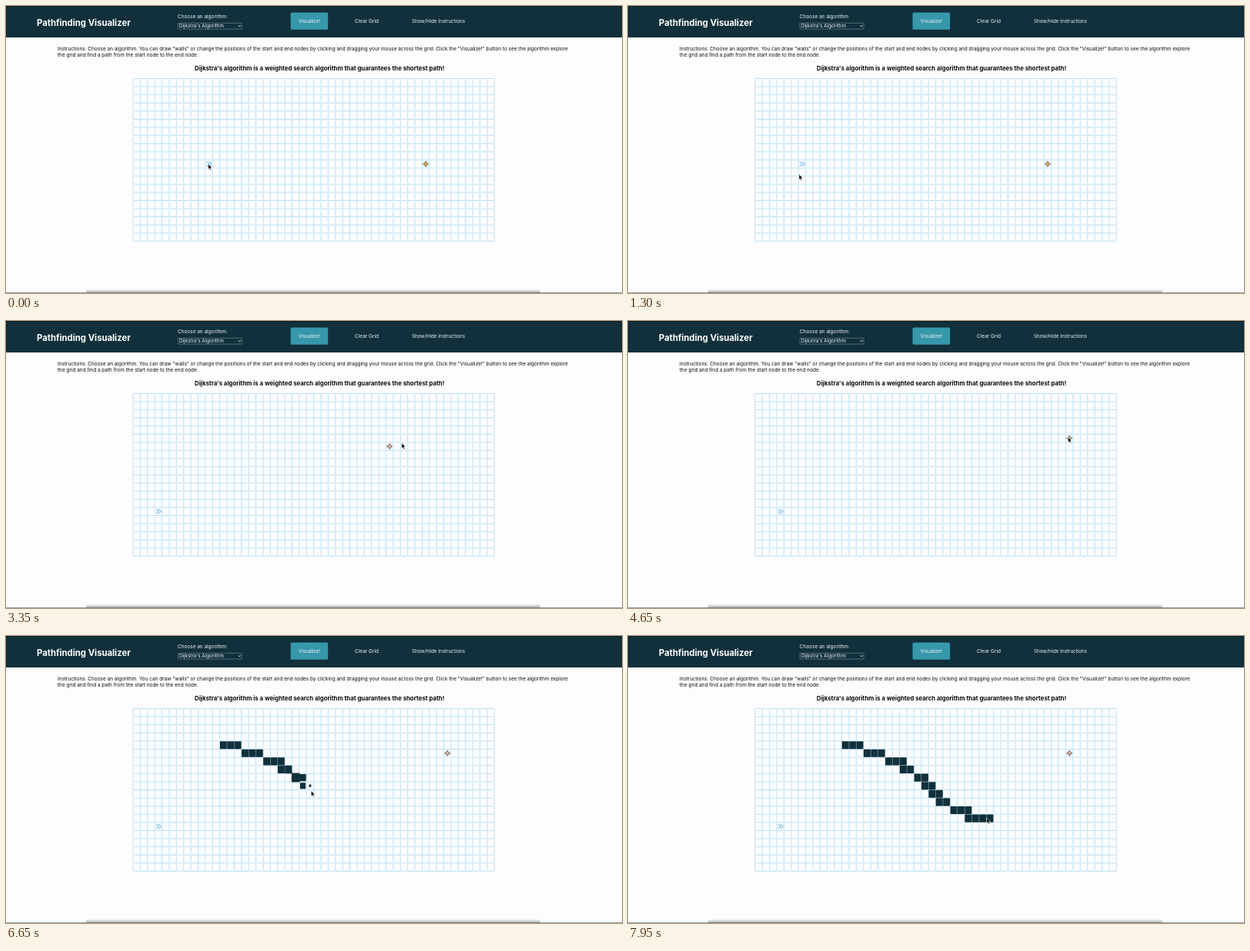
An HTML page for the animation above (8000 ms loop, 800 px wide and 374 px high).

```html
<!DOCTYPE html>
<html lang="en">
<head>
<meta charset="utf-8">
<title>Pathfinding Visualizer</title>
<style>
  html, body { margin: 0; width: 100%; height: 100%; overflow: hidden; background: #fdfdff; }
  svg { display: block; width: 100vw; height: 100vh; }
  text { font-family: Inter, Roboto, sans-serif; font-size: 6.45px; fill: #0c0c0e; }
  .nav text { fill: #eef3f5; font-size: 6.3px; }
  .nav .title { font-size: 11.3px; font-weight: 700; fill: #fff; }
  .headline { font-size: 7.8px; font-weight: 700; }
</style>
</head>
<body>
<svg viewBox="0 0 800 374">
  <defs>
    <linearGradient id="shade" x1="0" x2="0" y1="0" y2="1">
      <stop offset="0" stop-color="#777" stop-opacity="0"/>
      <stop offset="1" stop-color="#666" stop-opacity=".6"/>
    </linearGradient>
  </defs>
  <rect width="800" height="374" fill="#fdfdff"/>
  <g class="nav">
    <rect width="800" height="41" fill="#11303b"/>
    <rect width="800" height="1" fill="#0a1c23"/>
    <text class="title" x="40" y="25.5">Pathfinding Visualizer</text>
    <text x="223" y="16" style="font-size:6.45px">Choose an algorithm:</text>
    <rect x="223.4" y="22.3" width="82.8" height="7.8" rx=".6" fill="#11303b" stroke="#71858d" stroke-width=".7"/>
    <text x="225" y="28.4">Dijkstra's Algorithm</text>
    <path d="M301.6 25.2l1.6 1.8 1.6-1.8" fill="none" stroke="#eef3f5" stroke-width=".8"/>
    <rect x="369.6" y="8.6" width="48.6" height="22.2" rx="1.6" fill="#3797ab"/>
    <text x="394" y="22.2" text-anchor="middle">Visualize!</text>
    <text x="468.5" y="22.2" text-anchor="middle" style="font-size:6.5px">Clear Grid</text>
    <text x="561.5" y="22.2" text-anchor="middle">Show/Hide Instructions</text>
  </g>
  <text x="67" y="58.3">Instructions: Choose an algorithm. You can draw "walls" or change the positions of the start and end nodes by clicking and dragging your mouse across the grid. Click the "Visualize!" button to see the algorithm explore</text>
  <text x="67" y="66.2">the grid and find a path from the start node to the end node.</text>
  <text class="headline" x="407.2" y="83.7" text-anchor="middle">Dijkstra's algorithm is a weighted search algorithm that guarantees the shortest path!</text>
  <path id="grid" fill="none" stroke="#b9def4"/>
  <path id="start" d="M-2.8-3.1L.3 0-2.8 3.1M.3-3.1L3.4 0 .3 3.1" fill="none" stroke="#459fdb"/>
  <g id="goal" stroke="#5b5551" stroke-width=".75">
    <circle r="2.4"/>
    <path d="M0-4.2V-1.3M0 4.2V1.3M-4.2 0H-1.3M4.2 0H1.3"/>
  </g>
  <path id="walls" fill="#11303b"/>
  <rect x="104" y="369" width="590" height="5" rx="2" fill="url(#shade)"/>
  <rect y="373.3" width="800" height=".7" fill="#77777a"/>
  <path id="cursor" d="M0 0V7L1.6 5.6 2.7 8.1 4 7.5 2.9 5.1 5 5Z" fill="#050505" stroke="#fff" stroke-width=".6" stroke-linejoin="round"/>
</svg>
<script>
const LOOP = 8000, LEFT = 165, TOP = 94.5, CW = 9.385, CH = 10.6, COLS = 50, ROWS = 20;
const DRAG_LAG = 80, WALL_LAG = 40, GROW = 300;
const DRAW_FROM = 5670, DRAW_TO = 7200;
const $ = id => document.getElementById(id);

// Mouse strokes: start time, time per point, points as [column, row]. It rests in between.
const strokes = [
  [300, 900, [10.4, 10.5], [6.2, 10.6]],
  [1200, 120, [6.2, 10.6], [6.05, 12], [4.8, 13.5], [3.5, 14.4]],
  [1740, 210, [3.5, 14.4], [20, 13]],
  [2080, 520, [20, 13], [40.5, 10.5]],
  [2950, 160, [40.5, 10.5], [37, 8], [35.6, 6.4], [38.7, 5.8], [41.5, 5.5], [43.3, 5.35]],
  [4700, 780, [43.3, 5.35], [12.5, 4.4]],
  [DRAW_FROM, 162, [12.5, 4.4], [13.8, 4.6], [15, 5], [18, 6], [20.5, 7], [22, 8],
    [24.5, 10], [27, 12], [29.5, 13], [32.05, 13.45]]
];

const clamp = (v, lo, hi) => Math.min(hi, Math.max(lo, v));

function mouse(t) {
  const [from, step, ...pts] = strokes.findLast(s => s[0] <= t) || strokes[0];
  const at = clamp((t - from) / step, 0, pts.length - 1);
  const i = Math.min(Math.floor(at), pts.length - 2);
  return pts[i].map((v, k) => v + (pts[i + 1][k] - v) * (at - i));
}

const toX = col => LEFT + col * CW;
const toY = row => TOP + row * CH;
const move = (id, [col, row]) =>
  $(id).setAttribute('transform', `translate(${toX(col)} ${toY(row)})`);

// Each cell side is its own dash, leaving small gaps at the crossings.
let lines = '';
for (let r = 0; r <= ROWS; r++) {
  for (let c = 0; c <= COLS; c++) {
    if (c < COLS) lines += `M${toX(c) + .4} ${toY(r)}h${CW - .8}`;
    if (r < ROWS) lines += `M${toX(c)} ${toY(r) + .4}v${CH - .8}`;
  }
}
$('grid').setAttribute('d', lines);

// Every cell the mouse enters while drawing becomes a wall.
const walls = [];
for (let t = DRAW_FROM; t < DRAW_TO; t++) {
  const [col, row] = mouse(t).map(Math.floor);
  const last = walls.at(-1);
  if (!last || last.col !== col || last.row !== row) {
    walls.push({ col, row, born: t + WALL_LAG });
  }
}

// A dragged node snaps to the cell the mouse was over a moment ago.
const dragged = (t, from, to) =>
  mouse(clamp(t - DRAG_LAG, from, to)).map(v => Math.floor(v) + .5);

const easeOut = p => 1 - (1 - p) ** 2;

function wallSize(age) {
  const p = Math.min(age / GROW, 1) * 2;
  return p < 1 ? .3 + .9 * easeOut(p) : 1.2 - .2 * easeOut(p - 1);
}

function wallPath({ col, row, born }, t) {
  const size = wallSize(t - born), w = 9 * size, h = 10.1 * size;
  return `M${toX(col + .5) - w / 2} ${toY(row + .5) - h / 2}h${w}v${h}h${-w}z`;
}

function draw(t) {
  move('start', dragged(t, 0, 1700));
  move('goal', dragged(t, 2950, 4600));
  $('goal').setAttribute('fill', t < 3000 ? '#f5c653' : '#f3c4a8');
  $('walls').setAttribute('d', walls.filter(w => w.born <= t).map(w => wallPath(w, t)).join(''));
  move('cursor', mouse(t));
}

function tick() {
  draw(performance.now() % LOOP);
  requestAnimationFrame(tick);
}
tick();
</script>
</body>
</html>
```
